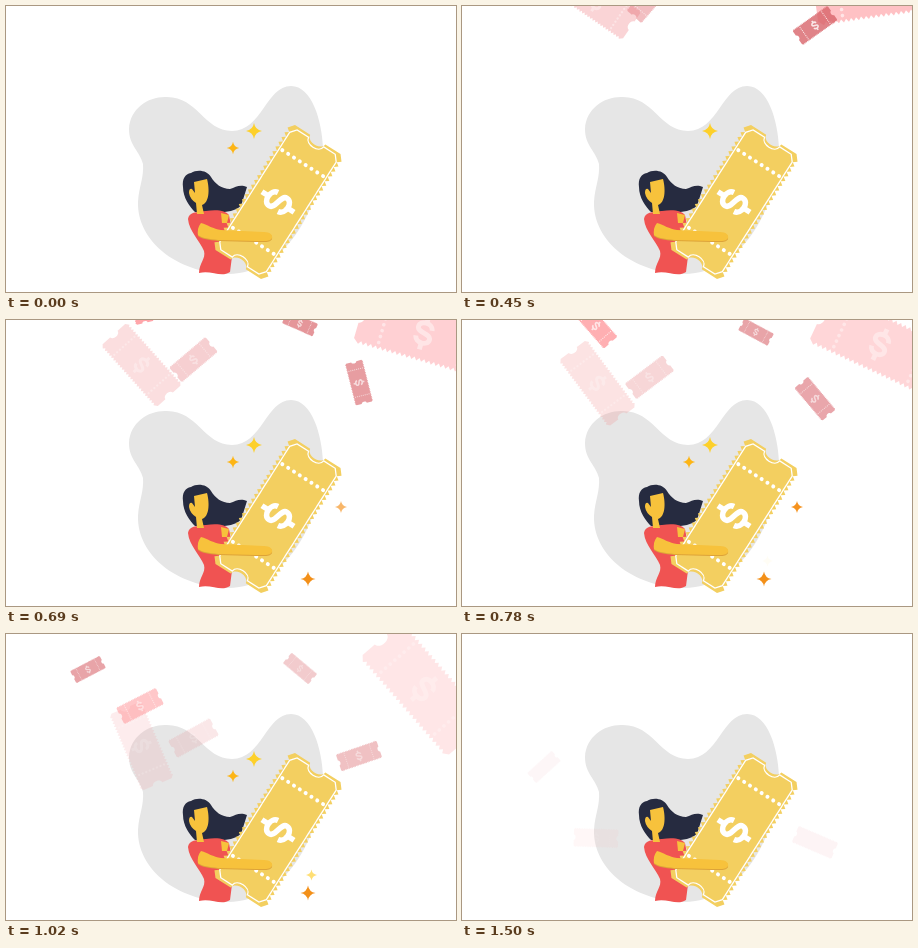
Recreate the animation shown at these times as an HTML page with a canvas. Size 450 by 286 pixels, loop 1800 ms.

```html
<!DOCTYPE html>
<html>
<head>
<meta charset="utf-8">
<style>
  html, body { margin: 0; width: 100%; height: 100%; overflow: hidden; background: #fff; }
  canvas { display: block; }
</style>
</head>
<body>
<canvas id="stage" width="450" height="286"></canvas>
<script>
const ctx = document.getElementById('stage').getContext('2d');
const GOLD = '#f3cf60', SKIN = '#f7c23c', RED = '217,101,108', PINK = '255,140,145';

// Ticket outline, long axis horizontal, notched ends, optional teeth on the long sides
function outline(w, h, teeth) {
  const p = new Path2D();
  for (const s of [1, -1]) {
    for (let i = 0; i <= 48; i++) {
      const x = s * (i / 24 - 1) * (w - 6);
      p.lineTo(x, -s * (h - (i % 2 ? teeth : 0)));
    }
    p.lineTo(s * w, -s * (h - 5));
    p.lineTo(s * w, -s * 9);
    p.bezierCurveTo(s * (w - 8), -s * 8, s * (w - 8), s * 8, s * w, s * 9);
    p.lineTo(s * w, s * (h - 5));
  }
  p.closePath();
  return p;
}

const body = outline(74, 32, 3.8), rim = outline(71, 27.6, 0);
const dollar = new Path2D('M8-5C7-13.5-8-13.5-8-5.5C-8 1.5 8-1.5 8 5.5C8 13.5-7 13.5-8 5M0-19V-12M0 12V19');
const blob = new Path2D('M123 123C124 102 143 90 161 91C192 91 198 125 226 125C256 125 260 80 285 80C306 80 316 115 317 142C318 190 285 268 222 268C171 267 131 235 132 196C133 180 138 172 137 158C134 145 123 140 123 123Z');
const hair = new Path2D('M177 181C176 173 179 168 185 167C191 163 201 164 205 171C209 178 216 183 224 183C230 181 234 178 241 181L235 200C228 206 217 207 202 206L189 206C184 201 177 192 177 181Z');
const face = new Path2D('M188 176L201 173C204 184 203 197 196 199L198 208H191L190 197Q184 193 183 187Q183 182 186 183L189 187Z');
const dress = new Path2D('M182 213C183 206 190 206 200 205C212 203 220 205 223 209L228 235L224 266C215 272 206 264 193 267C193 257 200 253 198 245C194 235 183 225 182 213Z');
const arm = new Path2D('M195 217C202 219 207 223 215 224L258 226C264 226 267 229 266 232C264 236 258 235 250 235L212 234C203 233 196 232 192 229Q191 222 195 217Z');
const hand = new Path2D('M215 207L223 209L221 217L216 217Z');

// x, y and angle at t = 1020, their speeds per ms, scale, colour, fade-out time and length
const tickets = [
  { x: 135.5, y: 112, vy: .203, a: 67, va: .057, size: .56, rgb: '240,140,143', end: 1450, fade: 2700 },
  { x: 187.5, y: 104, vy: .195, a: -28.5, va: .036, size: .32, rgb: '228,120,126', end: 1360, fade: 1900 },
  { x: 134, y: 72, vy: .275, a: -27, va: -.315, size: .3, rgb: PINK, end: 1580, fade: 1150 },
  { x: 418, y: 55, vy: .127, a: 49, va: .1, size: .89, rgb: '255,150,155', end: 1400, fade: 1600 },
  { x: 353, y: 122, vy: .18, a: -199, va: -.287, size: .29, rgb: RED, end: 1600, fade: 1430 },
  { x: 82, y: 35.5, vy: .203, a: -27.5, va: -.031, size: .225, rgb: RED, end: 1550, fade: 900 },
  { x: 294, y: 34.5, vy: .094, a: 40, va: .049, size: .225, rgb: RED, end: 1340, fade: 950 }
];

// x, y, radius, colour, then visible windows: fade-in start/end, fade-out start/end
const sparkles = [
  [248, 125, 8, '#fdd02a', [-2, -1, 1290, 1380]],
  [227, 142, 6.2, '#fdb515', [-2, -1, 150, 240], [480, 540, 1290, 1380]],
  [302, 259, 7.5, '#f39019', [510, 630, 1080, 1200]],
  [335, 187, 6, '#f5921e', [630, 720, 850, 950]],
  [305.5, 241, 5.5, '#ffd95a', [760, 1070, 1110, 1280]]
];

const clamp = v => Math.max(0, Math.min(1, v));

function fill(path, color) {
  ctx.fillStyle = color;
  ctx.fill(path);
}

function ticket(x, y, angle, size, color, alpha, rimmed) {
  ctx.save();
  ctx.globalAlpha = alpha;
  ctx.translate(x, y);
  ctx.rotate(angle * Math.PI / 180);
  ctx.scale(size, size);
  fill(body, color);
  ctx.strokeStyle = ctx.fillStyle = '#fff';
  if (rimmed) {
    ctx.lineWidth = 1.3;
    ctx.stroke(rim);
  }
  ctx.lineWidth = 5.5;
  ctx.stroke(dollar);
  ctx.beginPath();
  for (const dx of [-46, 46]) {
    for (let i = 0; i < 8; i++) {
      const dy = (i - 3.5) * 6.9;
      ctx.moveTo(dx + 2, dy);
      ctx.arc(dx, dy, 2, 0, 7);
    }
  }
  ctx.fill();
  ctx.restore();
}

function sparkle([x, y, r, color, ...windows], t) {
  ctx.globalAlpha = Math.max(...windows.map(([a, b, c, d]) =>
    Math.min(clamp((t - a) / (b - a)), clamp((d - t) / (d - c)))));
  ctx.beginPath();
  ctx.moveTo(x + r, y);
  for (let i = 1; i <= 4; i++) {
    const q = i * Math.PI / 2, m = q - Math.PI / 4;
    ctx.quadraticCurveTo(x + r * .2 * Math.cos(m), y + r * .2 * Math.sin(m),
      x + r * Math.cos(q), y + r * Math.sin(q));
  }
  ctx.fillStyle = color;
  ctx.fill();
  ctx.globalAlpha = 1;
}

function woman() {
  fill(hair, '#262b40');
  fill(dress, '#f05352');
  fill(face, SKIN);
  fill(hand, SKIN);
  ticket(272, 196, -57.5, 1, GOLD, 1, true);
  ctx.save();
  ctx.translate(0, 1);
  fill(arm, '#dda338');
  ctx.restore();
  fill(arm, SKIN);
}

function draw(now) {
  let t = Math.min(1500, Math.floor(now % 1800 / 30) * 30);
  if (t < 60) t = 0;
  ctx.fillStyle = '#fff';
  ctx.fillRect(0, 0, 450, 286);
  fill(blob, '#e6e6e6');
  for (const k of tickets) {
    const d = t - 1020;
    ticket(k.x, k.y + k.vy * d, k.a + k.va * d, k.size, `rgb(${k.rgb})`, clamp((k.end - t) / k.fade));
  }
  woman();
  sparkles.forEach(s => sparkle(s, t));
  requestAnimationFrame(() => draw(performance.now()));
}
draw(performance.now());
</script>
</body>
</html>
```
